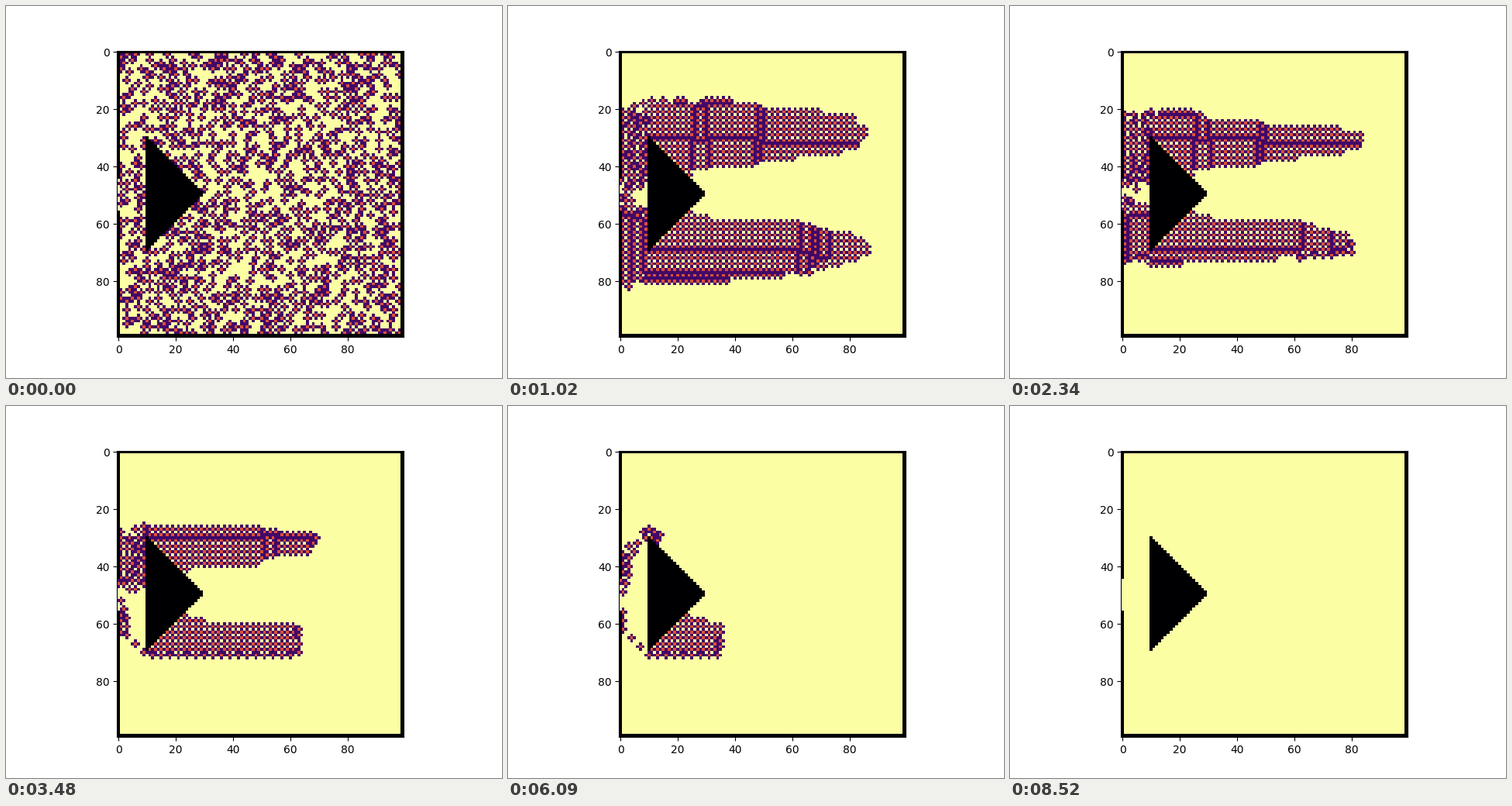
Write a matplotlib script that moves like this. It is 640 px wide and 480 px high and loops after 8580 ms.

```python
import random
from collections import deque

import matplotlib.pyplot as plt
import numpy as np
from matplotlib.animation import FuncAnimation

SIZE = 100
CROWD = 1000
FRAMES = 286
WALL, HALO, PERSON, FLOOR = 0.0, 0.2, 0.6, 1.0
SIDES = [(-1, 0), (1, 0), (0, -1), (0, 1)]
AROUND = SIDES + [(-1, -1), (-1, 1), (1, -1), (1, 1)]
rng = random.Random(7)


def build_room():
    room = np.full((SIZE, SIZE), FLOOR)
    room[[0, -1], :] = WALL
    room[:, [0, -1]] = WALL
    room[45:56, 0] = FLOOR
    for k in range(20):
        room[30 + k:70 - k, 10 + k] = WALL
    return room


def open_neighbours(cell, offsets):
    for dr, dc in offsets:
        r, c = cell[0] + dr, cell[1] + dc
        if 0 <= r < SIZE and 0 <= c < SIZE and room[r, c] == FLOOR:
            yield r, c


def exit_distance():
    """Walking distance to the door for every floor cell."""
    dist = {(r, 0): 0 for r in range(45, 56)}
    queue = deque(dist)
    while queue:
        cell = queue.popleft()
        for nxt in open_neighbours(cell, SIDES):
            if nxt not in dist:
                dist[nxt] = dist[cell] + 1
                queue.append(nxt)
    return dist


room = build_room()
dist = exit_distance()
options = {
    cell: [n for n in open_neighbours(cell, AROUND) if dist[n] <= dist[cell]]
    for cell in dist
}
# How many people claim each cell; padded by one on every side.
claims = np.zeros((SIZE + 2, SIZE + 2), int)


def claim(cell, amount):
    r, c = cell
    claims[r:r + 3, c:c + 3] += amount


def is_free(cell):
    return claims[cell[0] + 1, cell[1] + 1] == 0


def place_crowd():
    cells = [cell for cell in dist if cell[1] > 0]
    rng.shuffle(cells)
    people = []
    for cell in cells:
        if len(people) < CROWD and is_free(cell):
            claim(cell, 1)
            people.append(cell)
    return people


def advance(people):
    moved = []
    for cell in sorted(people):
        claim(cell, -1)
        if cell[1] == 0:
            continue
        choices = sorted(options[cell], key=lambda n: dist[n] + 0.5 * rng.random())
        cell = next((n for n in choices if is_free(n)), cell)
        claim(cell, 1)
        moved.append(cell)
    return moved


def simulate():
    people = place_crowd()
    history = [people]
    while people and len(history) < 1200:
        people = advance(people)
        history.append(people)
    return history


def paint(people):
    crowd = np.zeros((SIZE, SIZE), bool)
    for cell in people:
        crowd[cell] = True
    halo = np.zeros_like(crowd)
    for shift in SIDES:
        halo |= np.roll(crowd, shift, (0, 1))
    grid = room.copy()
    grid[halo & (room == FLOOR)] = HALO
    grid[crowd] = PERSON
    return grid


history = simulate()
# The last person leaves just before the loop ends.
steps = np.linspace(0, len(history) - 1, FRAMES - 1).round().astype(int)

fig, ax = plt.subplots(figsize=(6.4, 4.8), dpi=100)
image = ax.imshow(paint(history[0]), cmap="inferno", vmin=0, vmax=1)


def update(i):
    image.set_data(paint(history[steps[min(i, FRAMES - 2)]]))
    return [image]


anim = FuncAnimation(fig, update, frames=FRAMES, interval=30,
                     repeat=True, repeat_delay=0)
plt.show()
```
